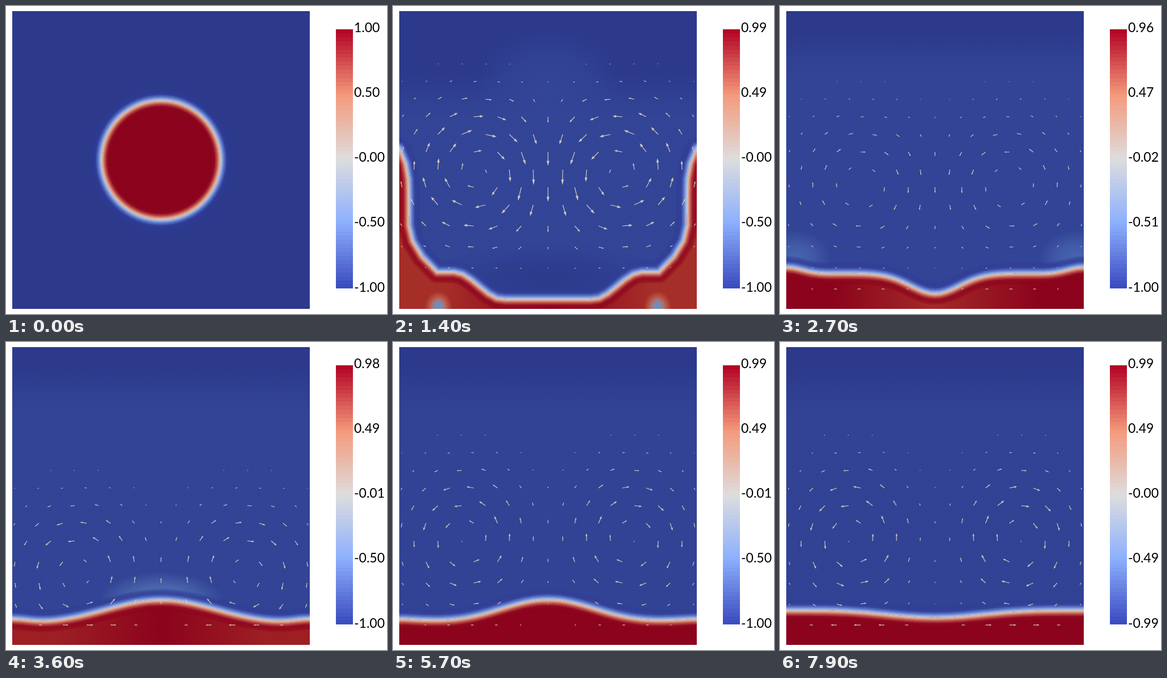
Animation, 671 px wide and 542 px high, one loop 8000 ms. Source, as an HTML page with a canvas:

```html
<!DOCTYPE html>
<html lang="en">
<head>
<meta charset="utf-8">
<title>Falling drop, phase field</title>
<style>
html, body { margin: 0; width: 100%; height: 100%; overflow: hidden; background: #fff; }
canvas { display: block; }
</style>
</head>
<body>
<canvas id="stage" width="671" height="542"></canvas>
<script>
const ctx = document.getElementById('stage').getContext('2d');
const LOOP = 8000, STEP = 100;
const BOX = { x: 11, y: 9, w: 524, h: 524 };
const MID = 273, HALF = 262, RADIUS = 105;
const IMPACT = 500, SPREAD = 900, POOLED = 1900;

const { PI, cos, sin, min, max, exp } = Math;
const mix = (a, b, k) => a + (b - a) * k;
const mixAll = (a, b, k) => a.map((v, i) => mix(v, b[i], k));
const clamp = k => max(0, min(1, k));
const smooth = k => (k = clamp(k), k * k * (3 - 2 * k));
const pulse = (t, center, width) => exp(-(((t - center) / width) ** 2));
const rgb = (c, a = 1) => `rgba(${c.map(Math.round).join()},${a})`;

const DEEP = [139, 3, 28], RUST = [166, 46, 40], NAVY = [45, 58, 140], SKY = [51, 69, 151];
const RAMP = [[59, 76, 192], [141, 176, 254], [221, 221, 221], [244, 154, 123], [180, 4, 38]];

// Diverging colour for a field value from -1 to 1.
function tone(value) {
  const p = (value + 1) * 2, i = min(3, Math.floor(p));
  return mixAll(RAMP[i], RAMP[i + 1], p - i);
}

// Colour in the plot at a depth below the surface; the flat ends are shaded.
function depthTone(depth) {
  const value = Math.tanh(depth / 7.5);
  const shade = 0.765 + 0.17 * (1 - value * value);
  return rgb(tone(value).map(c => c * shade));
}

// Cycles of the slow sloshing, which quickens a little.
const sloshPhase = t => {
  const s = (t - 3600) / 1000;
  return 2 * PI * (0.5 + s / 2.05 + 0.011 * s * s);
};

function poolHeight(dx, t) {
  const a = PI * dx / HALF;
  const slosh = 20 * smooth((t - 2600) / 1000) * cos(sloshPhase(t));
  const ripple = -6 * sin(PI * (t - 2900) / 4600);
  const jet = 52 * cos(PI * (t - 2100) / 600) * pulse(t, 2400, 450);
  const wall = 30 * pulse(t, 4700, 600) + 16 * pulse(t, 3000, 600);
  return 477 - 6 * pulse(t, 2500, 600) + slosh * cos(a) + ripple * cos(2 * a)
    - jet * pulse(dx, 0, 60) - wall * pulse(dx, HALF, 40);
}

// Right half of the splash: thin floor layer, shoulder, film up the wall.
function splashHalf(t) {
  const shoulder = 516 - 48 * clamp((t - SPREAD) / 400);
  const top = 250 + 0.0009 * (t - 1400) ** 2;
  const pts = [];
  for (let dx = 0; dx < 190; dx += 15) {
    pts.push([dx, mix(516, shoulder, smooth((dx - 80) / 85))]);
  }
  for (let k = 8; k >= 0; k--) {
    const y = mix(top, shoulder, k / 8);
    const film = 17 * Math.sqrt(clamp((y - top) / 60));
    const foot = 50 * max(0, 1 - (shoulder - y) / 86) ** 2;
    pts.push([HALF - film - foot, y]);
  }
  const settle = smooth((t - 1550) / 350);
  return pts.map(([dx, y]) => [dx, mix(y, poolHeight(dx, t), settle)]);
}

function poolHalf(t) {
  return Array.from({ length: 28 }, (_, i) => {
    const dx = i * HALF / 27;
    return [dx, poolHeight(dx, t)];
  });
}

function surface(t) {
  const path = new Path2D();
  if (t < SPREAD) {
    const fall = min(1, t / IMPACT) ** 2, flat = clamp((t - IMPACT) / (SPREAD - IMPACT));
    const cy = mix(271 + 156 * fall, 540, flat);
    path.ellipse(MID, cy, mix(RADIUS, 290, flat), mix(RADIUS, 45, flat), 0, 0, 2 * PI);
    return path;
  }
  const half = t < POOLED ? splashHalf(t) : poolHalf(t);
  const [, edge] = half[half.length - 1];
  const side = [...half, [HALF + 50, edge], [HALF + 50, 600]];
  for (const [dx, y] of side.slice().reverse()) path.lineTo(MID - dx, y);
  for (const [dx, y] of side) path.lineTo(MID + dx, y);
  path.closePath();
  return path;
}

function fillBox(style) {
  ctx.fillStyle = style;
  ctx.fillRect(BOX.x, BOX.y, BOX.w, BOX.h);
}

function glow(x, y, rx, ry, color, alpha) {
  if (alpha < 0.02) return;
  ctx.save();
  ctx.translate(x, y);
  ctx.scale(rx, ry);
  const g = ctx.createRadialGradient(0, 0, 0, 0, 0, 1);
  g.addColorStop(0, rgb(color, alpha));
  g.addColorStop(0.5, rgb(color, alpha * 0.65));
  g.addColorStop(1, rgb(color, 0));
  ctx.fillStyle = g;
  ctx.fillRect(-1, -1, 2, 2);
  ctx.restore();
}

function air(t) {
  fillBox(rgb(NAVY));
  const lift = clamp((t - 300) / 800) * mix(1, 0.75, t / LOOP);
  const top = 45 + 75 * pulse(t, 1300, 700);
  const g = ctx.createLinearGradient(0, top, 0, top + 80);
  g.addColorStop(0, rgb(SKY, 0));
  g.addColorStop(1, rgb(SKY, lift));
  fillBox(g);
  glow(MID, 145, 130, 105, SKY, pulse(t, 1400, 500));
  glow(MID, 480, 210, 65, NAVY, pulse(t, 1400, 500));
  for (const x of [25, 521]) glow(x, 445, 65, 50, [95, 135, 200], 0.5 * pulse(t, 2700, 300));
  glow(MID, 455, 110, 50, [110, 155, 205], 0.6 * pulse(t, 3600, 350));
}

// Nested strokes, widest first, give the soft edge; the far ones are faint.
function softEdge(path, sign) {
  for (let d = 20; d > 0; d -= 0.75) {
    ctx.globalAlpha = d > 10 ? 0.15 : 1;
    ctx.lineWidth = 2 * d;
    ctx.strokeStyle = depthTone(sign * d);
    ctx.stroke(path);
  }
  ctx.globalAlpha = 1;
}

function liquid(t) {
  const path = surface(t);
  ctx.lineJoin = 'round';
  softEdge(path, -1);
  ctx.save();
  ctx.clip(path);
  const wall = pulse(t, 1400, 400) + 0.65 * pulse(t, 3600, 400);
  const middle = 0.9 * pulse(t, 2700, 350);
  const g = ctx.createLinearGradient(BOX.x, 0, BOX.x + BOX.w, 0);
  for (const p of [0, 0.15, 0.5, 0.85, 1]) {
    g.addColorStop(p, rgb(mixAll(DEEP, RUST, p === 0.5 ? middle : wall)));
  }
  fillBox(g);
  softEdge(path, 1);
  const bubble = pulse(t, 1400, 250);
  for (const x of [80, 466]) {
    glow(x, 530, 24, 28, [205, 130, 105], bubble);
    glow(x, 530, 14, 18, [95, 145, 205], bubble);
  }
  ctx.restore();
}

// The pair of vortices turns round as the pool begins to slosh.
function flowAt(t) {
  const turned = smooth((t - 2200) / 1300);
  return {
    power: mix(-20 * min(1, t / 600), 11 + 4 * t / LOOP, turned),
    cx: mix(150, 127, turned),
    cy: mix(292, 347, turned) + 100 * pulse(t, 500, 400) + 65 * pulse(t, 3500, 500),
    size: mix(110, 80, t / LOOP),
    drift: smooth((t - 2000) / 500) *
      (12 * pulse(t, 2700, 350) - 12 * pulse(t, 3600, 300) - 13 * sin(sloshPhase(t)))
  };
}

function velocity(x, y, flow) {
  if (y > 490) return [-flow.drift * sin(PI * (MID - x) / HALF), 0];
  let u = 0, v = 0;
  for (const side of [1, -1]) {
    const cx = side > 0 ? flow.cx : 2 * MID - flow.cx;
    const px = (x - cx) / flow.size, py = (y - flow.cy) / 100;
    const s = side * flow.power * 2.33 * exp(-px * px - py * py);
    u += s * py;
    v -= s * px;
  }
  return [u, v];
}

function arrow(x, y, u, v) {
  const len = Math.hypot(u, v);
  if (len < 1.2) return;
  const head = len * 0.36, w = min(2.4, len * 0.13);
  ctx.save();
  ctx.translate(x, y);
  ctx.rotate(Math.atan2(v, u));
  ctx.fillRect(0, -0.6, len - head, 1.2);
  ctx.beginPath();
  ctx.moveTo(len, 0);
  ctx.lineTo(len - head, -w);
  ctx.lineTo(len - head, w);
  ctx.fill();
  ctx.restore();
}

function arrows(t) {
  const flow = flowAt(t);
  ctx.fillStyle = '#cfcabb';
  for (let k = -4; k < 11; k++) {
    const y = 350 - k * (k < 0 ? 37 : 31);
    for (let i = 0; i < 13; i++) {
      if (k < 0 ? i % 2 : (i + k) % 2 === 0) continue;
      const x = i === 12 ? MID : 16 + 21 * i;
      const [u, v] = velocity(x, y, flow);
      arrow(x, y, u, v);
      if (x < MID) arrow(2 * MID - x, y, -u, v);
    }
  }
}

function legend(t) {
  const top = 41, height = 456, bands = 64;
  for (let i = 0; i < bands; i++) {
    const y0 = Math.round(top + i * height / bands), y1 = Math.round(top + (i + 1) * height / bands);
    ctx.fillStyle = rgb(tone(1 - 2 * i / (bands - 1)));
    ctx.fillRect(581, y0, 30, y1 - y0);
  }
  const high = 1 - 0.008 * min(1, t / 1000) - 0.005 * t / LOOP - 0.03 * pulse(t, 2850, 560);
  const low = -1.0001 + 0.012 * smooth((t - 5800) / 2100);
  ctx.fillStyle = '#000';
  ctx.font = '23px Lato, sans-serif';
  for (let i = 0; i < 5; i++) {
    ctx.fillText(mix(high, low, i / 4).toFixed(2), 613, 45.5 + i * 114.25);
  }
}

function draw(t) {
  ctx.fillStyle = '#fff';
  ctx.fillRect(0, 0, 671, 542);
  ctx.save();
  ctx.beginPath();
  ctx.rect(BOX.x, BOX.y, BOX.w, BOX.h);
  ctx.clip();
  air(t);
  liquid(t);
  arrows(t);
  ctx.restore();
  legend(t);
}

const began = performance.now();
let shown = -1;
function tick() {
  const t = Math.floor(((performance.now() - began) % LOOP) / STEP) * STEP;
  if (t !== shown) draw(shown = t);
  requestAnimationFrame(tick);
}
tick();
</script>
</body>
</html>
```
